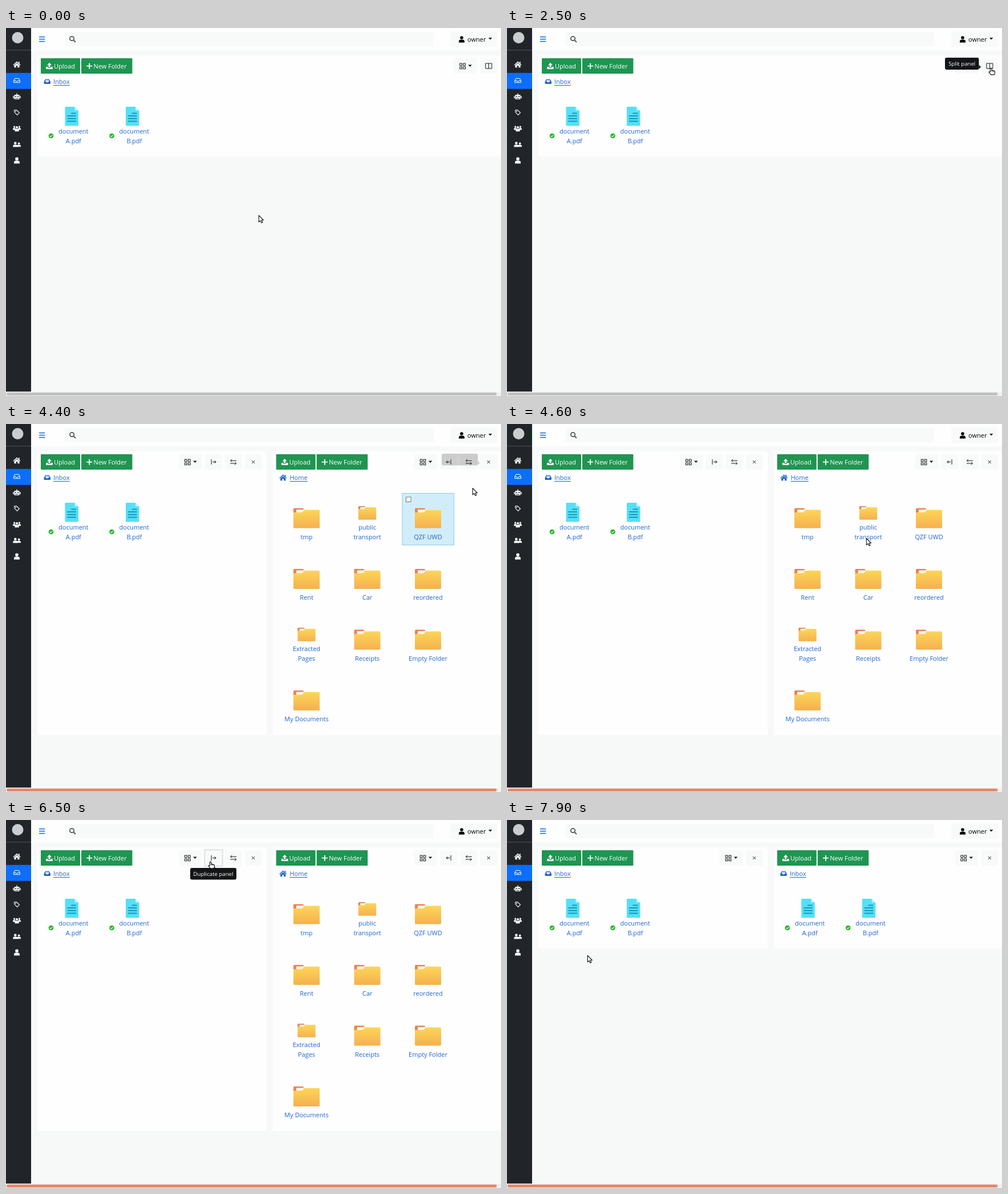
Recreate the animation shown at these times as an HTML page with a canvas. Size 868 by 645 pixels, loop 8000 ms.

```html
<!DOCTYPE html>
<html lang="en">
<head>
<meta charset="utf-8">
<title>File panels</title>
<style>
html, body { margin: 0; width: 100%; height: 100%; overflow: hidden; background: #f7f9f8; }
canvas { display: block; }
</style>
</head>
<body>
<canvas id="stage" width="868" height="645"></canvas>
<script>
const c = document.getElementById('stage').getContext('2d');
const LOOP = 8000, STEP = 100;
const PITCH = 106.5, SHIFT = 412.7;
const LINK = '#1f66cf', INK = '#15181b', PALE = '#f8f9f9', PANEL = '#fefefe';

const folders = [
  'tmp', 'public transport', 'QZF UWD', 'Rent', 'Car', 'reordered',
  'Extracted Pages', 'Receipts', 'Empty Folder', 'My Documents'
];
const twoLines = new Set(['public transport', 'Extracted Pages']);

// time, x, y of the pointer
const path = [
  [1000, 443, 328], [1100, 470, 318], [1200, 600, 256], [1300, 735, 195], [1400, 781, 181],
  [1500, 781, 181], [1600, 790, 170], [1700, 815, 140], [1800, 842, 106], [1900, 853, 85],
  [2000, 850, 72], [2100, 849, 70], [4100, 849, 70], [4200, 848, 74], [4300, 840, 88],
  [4400, 818, 112], [4500, 735, 165], [4600, 630, 200], [4700, 520, 212], [4800, 430, 182],
  [4900, 380, 132], [5000, 357, 101], [5100, 358, 89], [5200, 359, 79], [5300, 359, 73],
  [7400, 359, 73], [7500, 350, 96], [7600, 300, 190], [7700, 225, 262], [7800, 165, 272],
  [7900, 141, 237]
];
const handTimes = [[2000, 4300], [5200, 7500]];

const tips = [
  { text: 'Split panel', x: 768, y: 52, w: 59.5, h: 21, side: 'right',
    fade: [[1900, 0], [2000, .4], [2100, .96], [2400, .96], [2500, 1], [3300, 1], [3400, 0]] },
  { text: 'Close panel', x: 764, y: 52, w: 63.5, h: 20.5, side: 'right',
    fade: [[3400, 0], [3500, .4], [3600, .96], [3900, .96], [4000, 1], [4100, 1], [4200, .9], [4400, .2], [4500, 0]] },
  { text: 'Duplicate panel', x: 323, y: 84, w: 81, h: 20.5, side: 'top',
    fade: [[5100, 0], [5200, .27], [5300, .96], [5400, .96], [5500, 1], [6500, 1], [6600, .4], [6700, 0]] }
];

// linear value of a key list at time t
function at(keys, t) {
  const i = keys.findIndex(k => k[0] > t);
  if (i < 0) return keys[keys.length - 1].slice(1);
  if (i === 0) return keys[0].slice(1);
  const a = keys[i - 1], b = keys[i], p = (t - a[0]) / (b[0] - a[0]);
  return a.slice(1).map((v, n) => v + (b[n + 1] - v) * p);
}

function box(x, y, w, h, fill, r = 0) {
  c.fillStyle = fill;
  c.beginPath();
  c.roundRect(x, y, w, h, r);
  c.fill();
}
function disc(x, y, r, fill) {
  c.fillStyle = fill;
  c.beginPath();
  c.arc(x, y, r, 0, 7);
  c.fill();
}
function trace(d, color, width = 1) {
  c.strokeStyle = color;
  c.lineWidth = width;
  c.stroke(new Path2D(d));
}
function shape(d, color) {
  c.fillStyle = color;
  c.fill(new Path2D(d));
}
function text(s, x, y, color, align = 'left', size = 11) {
  c.font = size + 'px "Open Sans", "Noto Sans", sans-serif';
  c.textAlign = align;
  c.fillStyle = color;
  c.fillText(s, x, y);
}
function place(x, y, draw, sx = 1, sy = sx) {
  c.save();
  c.translate(x, y);
  c.scale(sx, sy);
  draw();
  c.restore();
}

// icons, each around its own centre
const home = color => () => {
  shape('M-6.5 .5L0 -5.5L6.5 .5L5.6 1.5L0 -3.6L-5.6 1.5Z M3 -5H4.6V-1H3Z', color);
  shape('M-4.6 1.5L0 -2.6L4.6 1.5V5.2H1.3V2H-1.3V5.2H-4.6Z', color);
};
const person = color => () => {
  disc(0, -2.8, 2.8, color);
  shape('M-5 5.6V4Q-5 .6 -1.8 .6H1.8Q5 .6 5 4V5.6Z', color);
};
const tray = () => {
  shape('M-3.4 -4H3.4L5.7 0V3Q5.7 4 4.7 4H-4.7Q-5.7 4 -5.7 3V0Z', LINK);
  shape('M-3.6 -.2L-2.7 -2.6H2.7L3.6 -.2H2L1.2 1.2H-1.2L-2 -.2Z', PANEL);
};
const trayOutline = () => trace('M-3.3 -3.6H3.3L5.4 .3V3.6H-5.4V.3Z M-5.4 .3H-2L-1.2 1.8H1.2L2 .3H5.4', '#fff');
const robot = () => {
  box(-4.6, -3, 9.2, 8, '#fff', 1.3);
  box(-.7, -5.5, 1.4, 3, '#fff');
  box(-6.8, -.8, 1.5, 4, '#fff', .6);
  box(5.3, -.8, 1.5, 4, '#fff', .6);
  disc(-2, 0, 1.1, '#212529');
  disc(2, 0, 1.1, '#212529');
  box(-2.8, 2.8, 5.6, 1, '#212529');
};
const tag = () => {
  trace('M-4.2 -4.2H-.4L4.4 .6L.6 4.4L-4.2 -.4Z', '#fff', 1.1);
  disc(-2, -2, .9, '#fff');
};
const pair = () => {
  place(-2.7, 0, person('#fff'), .8);
  place(3.6, .4, person('#fff'), .68);
};
const crowd = () => {
  place(-4.4, -1, person('#fff'), .52, .62);
  place(4.4, -1, person('#fff'), .52, .62);
  disc(0, -1.4, 2.8, '#212529');
  place(0, .6, person('#fff'), .72, .82);
};
const caret = (x, y) => shape(`M${x} ${y}h6.4l-3.2 3.6Z`, INK);

function sidebar() {
  box(0, 0, 44, 637.5, '#212529');
  disc(20.5, 17, 10, '#c9cdd0');
  box(0, 38.3, 44, 1, '#50555a');
  box(0, 78.7, 44, 28, '#0d6efd');
  [home('#fff'), trayOutline, robot, tag, crowd, pair, person('#fff')]
    .forEach((icon, i) => place(19, 64 + i * 28, icon));
}

function topBar() {
  box(44, 0, 824, 39.5, PANEL);
  for (let i = 0; i < 3; i++) box(58, 14.8 + i * 4, 10.3, 1.6, '#0d6efd');
  box(103, 7, 646.5, 25, PALE, 2);
  c.beginPath();
  c.arc(115.6, 18.5, 3.7, 0, 7);
  c.strokeStyle = '#55595c';
  c.lineWidth = 1.8;
  c.stroke();
  trace('M118.4 21.3L122 24.9', '#55595c', 2);
  box(779, 6, 82, 27, PALE, 2);
  place(799, 19.8, person('#000'));
  text('owner', 809, 24, '#000');
  caret(846, 17);
}

function scrollbar(hot) {
  box(0, 637.5, 868, 7.5, '#eff0f0');
  box(1, 639, 859.5, 5, hot ? '#e5876d' : '#bfc1c0', 2.5);
}

function greenButtons() {
  box(61, 53, 69, 27, '#1f9551', 1);
  shape('M76 60.8L80 65.2H77.2V69H74.8V65.2H72Z M70.2 68H73.8V70H78.2V68H81.8V72H70.2Z', '#fff');
  text('Upload', 84, 70.7, '#fff');
  box(132, 53, 89.5, 27, '#1f9551', 1);
  trace('M146.2 61.7V71.7M141.2 66.7H151.2', '#fff', 1.8);
  text('New Folder', 153.6, 70.7, '#fff');
}

function viewButton(x) {
  box(x, 53, 40.5, 27, PALE, 2);
  for (const dx of [10.5, 16.5])
    for (const y of [62, 68]) {
      c.strokeStyle = INK;
      c.lineWidth = 1;
      c.strokeRect(x + dx, y, 3.7, 3.7);
    }
  caret(x + 25.2, 64.4);
}
function iconButton(x, d, width = 1) {
  box(x, 53, 30, 27, PALE, 2);
  place(x + 15, 66.5, () => trace(d, INK, width));
}
const SPLIT = 'M-5.5 -4.5H5.5V4.5H-5.5ZM0 -4.5V4.5';
const CLOSE = 'M-2.5 -2.5L2.5 2.5M2.5 -2.5L-2.5 2.5';
const SWAP = 'M5.5 -2.3H-5M-2.5 -4.8L-5 -2.3L-2.5 .2M-5.5 2.6H5M2.5 .1L5 2.6L2.5 5.1';
const PUSH = 'M-3.6 -4.6V4.6M-1.6 0H4.4M1.9 -2.5L4.4 0L1.9 2.5';
const PULL = 'M3.6 -4.6V4.6M1.6 0H-4.4M-1.9 -2.5L-4.4 0L-1.9 2.5';

// toolbar of a split panel in left-hand coordinates
function splitTools(full, push, ring) {
  viewButton(full ? 303 : 372.7);
  if (full) {
    iconButton(348.7, push);
    if (ring) {
      c.strokeStyle = '#e3e5e6';
      c.lineWidth = 2.6;
      c.strokeRect(348.2, 52.2, 31.6, 28.6);
    }
    iconButton(383.7, SWAP);
  }
  iconButton(418.6, CLOSE);
}

function crumb(label, icon, iconX, x) {
  place(iconX, 94, icon);
  text(label, x, 98, LINK);
  box(x, 100, c.measureText(label).width, 1, LINK);
}

function doc(x, name) {
  place(x, 138, () => {
    shape('M1.5 0H17L23.5 6.5V32Q23.5 33.5 22 33.5H1.5Q0 33.5 0 32V1.5Q0 0 1.5 0Z', '#55e0f8');
    shape('M17 0L23.5 6.5H18Q17 6.5 17 5.5Z', '#c6f4fc');
    for (let i = 0; i < 4; i++) {
      const left = i ? 3.6 : 10.5;
      box(left, 10.4 + i * 4.7, 19.8 - left, 2, '#1798b5', 1);
    }
  });
  disc(x - 24.5, 189, 4.3, '#1fb81f');
  trace(`M${x - 26.5} 189l1.5 1.6l2.7 -3`, '#fff', 1.1);
  text('document', x + 14.8, 185, LINK, 'center');
  text(name, x + 14.8, 201.5, LINK, 'center');
}
function docs() {
  doc(103.5, 'A.pdf');
  doc(103.5 + PITCH, 'B.pdf');
}

function folderIcon(x, y, s) {
  place(x, y, () => {
    shape('M-23 10V1.5Q-23 0 -21.5 0H-7Q-5.5 0 -5 1.5V10Z', '#e88355');
    box(-18, 2.6, 38, 8, '#fdf6ee', 1);
    const g = c.createLinearGradient(0, 3, 0, 35);
    g.addColorStop(0, '#fcd658');
    g.addColorStop(1, '#f5b04f');
    shape('M-23 9Q-23 7.6 -21.5 7.6H-9Q-7 7.6 -6 5.5Q-4.8 3 -3 3H21.5Q23 3 23 4.5V33.5Q23 35 21.5 35H-21.5Q-23 35 -23 33.5Z', g);
  }, s);
}

const cell = i => ({ x: 527 + (i % 3) * PITCH, y: Math.floor(i / 3) * PITCH });

function folderGrid(hover) {
  folders.forEach((name, i) => {
    const { x, y } = cell(i);
    if (i === hover) {
      box(x - 45.5, y + 121.5, 91, 91, '#d2edfa');
      c.strokeStyle = '#8fcbe9';
      c.lineWidth = 1;
      c.strokeRect(x - 45, y + 121.5, 90.5, 90.5);
      box(x - 39, y + 127.5, 9.5, 9.5, '#fff', 1.5);
      trace(`M${x - 38.5} ${y + 128}h8.6v8.6h-8.6Z`, '#6d7174');
    }
    if (twoLines.has(name)) {
      const [a, b] = name.split(' ');
      folderIcon(x, y + 144, .68);
      text(a, x, y + 185, LINK, 'center');
      text(b, x, y + 201.5, LINK, 'center');
    } else {
      folderIcon(x, y + 147.5, 1);
      text(name, x, y + 201.5, LINK, 'center');
    }
  });
}

function hoveredCell(t) {
  if (t < 4300 || t > 4900) return -1;
  const [x, y] = at(path, t + STEP); // highlight leads the drawn pointer
  return folders.findIndex((_, i) => {
    const p = cell(i);
    return Math.abs(x - p.x) < 45.5 && y > p.y + 121.5 && y < p.y + 212;
  });
}

function panels(t) {
  const split = t >= 3400, twin = t >= 6600;
  const listed = t >= 3500 && !twin;
  const h = listed ? 497 : 177;
  box(55, 48, split ? 402 : 813, h, PANEL);
  greenButtons();
  crumb('Inbox', tray, 72.3, 83);
  docs();
  if (!split) {
    viewButton(785.3);
    iconButton(831.4, SPLIT);
    return;
  }
  splitTools(!twin, PUSH, t >= 6500);
  box(468, 48, 400, h, PANEL);
  place(SHIFT, 0, () => {
    greenButtons();
    splitTools(!twin, PULL, false);
    if (twin) {
      crumb('Inbox', tray, 72.3, 83);
      docs();
    } else {
      crumb('Home', home(LINK), 73, 84.8);
    }
  });
  if (listed) folderGrid(hoveredCell(t));
}

function tooltip({ text: label, x, y, w, h, side, fade }, t) {
  const [alpha] = at(fade, t);
  if (!alpha) return;
  c.save();
  c.globalAlpha = alpha;
  box(x, y, w, h, '#141516', 3);
  shape(side === 'right'
    ? `M${x + w} 64.5L${x + w + 3.5} 68.2L${x + w} 72Z`
    : `M${x + w / 2 - 4} ${y}l4 -3.6l4 3.6Z`, '#141516');
  text(label, x + w / 2, y + 13.8, '#fff', 'center', 9.65);
  c.restore();
}

function pointer(t) {
  const [x, y] = at(path, t);
  const hand = handTimes.some(([a, b]) => t >= a && t < b);
  const d = hand
    ? 'M-1.6 7V1.3Q-1.6 .1 -.4 .1Q.8 .1 .8 1.3V4.4Q2.3 3.8 2.8 4.8Q4.2 4.3 4.7 5.3Q6.4 5 6.4 6.6V8.5Q6.4 10 5.5 11.9H-.6Q-1.6 10.4 -3.6 8.2Q-4.3 7 -3.3 6.6Q-2.4 6.3 -1.6 7.2Z'
    : 'M.3 .5V12L3 9.6L4.9 13.6L6.9 12.7L5.1 8.8H8.6Z';
  place(x, y, () => {
    c.lineJoin = 'round';
    shape(d, '#fff');
    trace(d, '#111', 1.1);
    if (hand) trace('M.8 4.6V6.6M2.8 4.9V6.7M4.7 5.4V6.9', '#111', .8);
  });
}

function draw(t) {
  box(0, 0, 868, 645, '#f7f9f8');
  sidebar();
  topBar();
  panels(t);
  scrollbar(t >= 3200);
  tips.forEach(tip => tooltip(tip, t));
  pointer(t);
}

const start = performance.now();
function tick() {
  const t = (performance.now() - start) % LOOP;
  draw(Math.floor(t / STEP) * STEP);
  requestAnimationFrame(tick);
}
tick();
</script>
</body>
</html>
```
